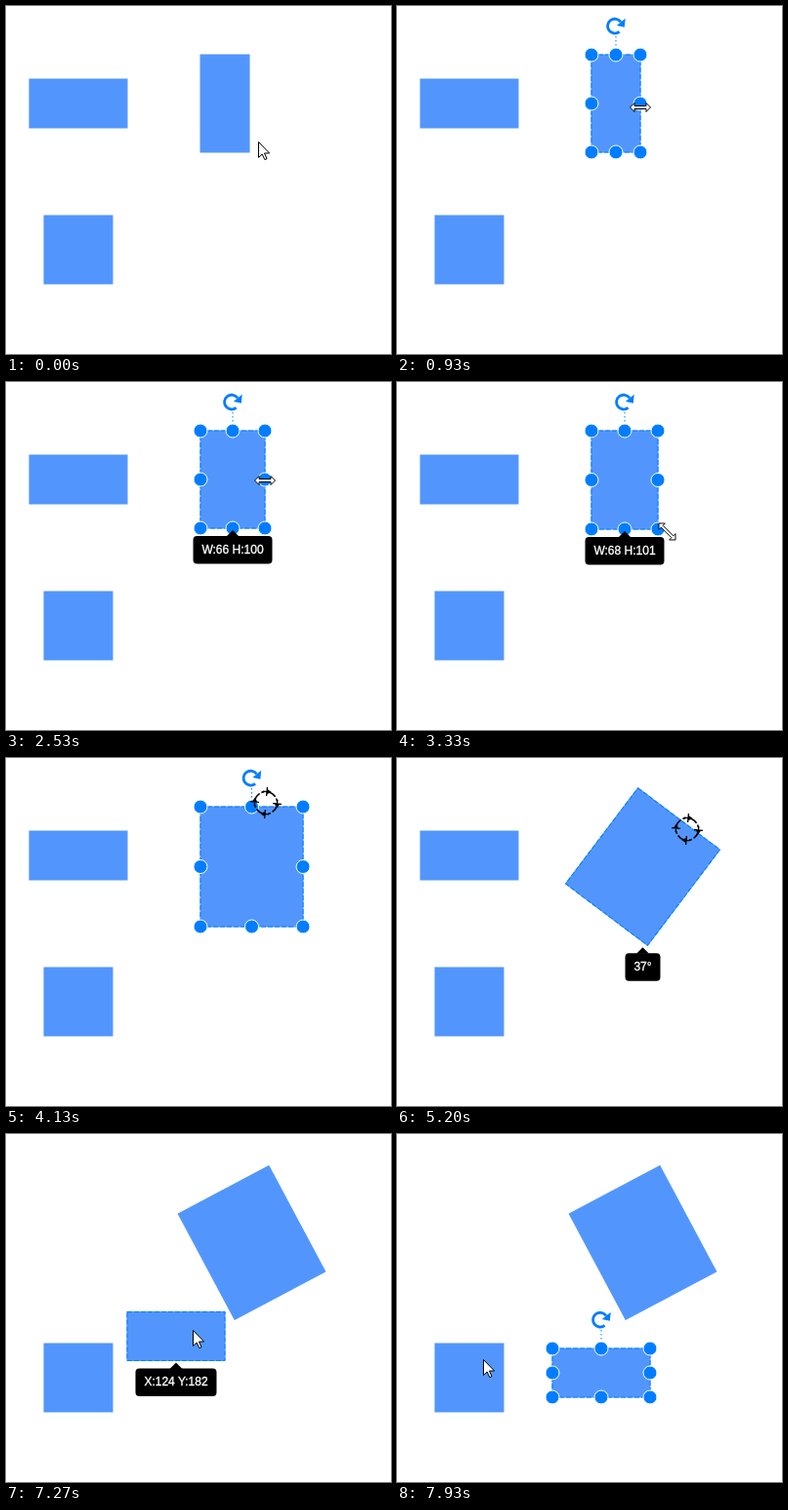
An HTML page for the animation above (8000 ms loop, 394x357 px).

```html
<!DOCTYPE html>
<html lang="en">
<head>
<meta charset="utf-8">
<title>Drag, resize, rotate</title>
<style>
  html, body { margin: 0; width: 100%; height: 100%; overflow: hidden; background: #fff; }
  svg { display: block; }
  .shape { fill: #5296fd; stroke: #5296fd; }
  .frame { fill: none; stroke: #007dff; stroke-dasharray: 5 2; }
  .knob { fill: #007dff; stroke: #fff; }
  .stem { stroke: #007dff; stroke-dasharray: 1.5 2.5; }
  .ring { fill: none; stroke: #007dff; stroke-width: 2.8; }
  .head { fill: #007dff; }
  #label { font: 12px "Liberation Sans", Arial, sans-serif; fill: #fff; stroke: #fff; stroke-width: .35; text-anchor: middle; }
  .pointer { fill: #fff; stroke: #000; }
  .arc { fill: none; stroke: #000; stroke-width: 1.6; stroke-dasharray: 8 2 3 5.06; }
  .barb { stroke: #000; stroke-width: 1.3; }
</style>
</head>
<body>
<svg width="394" height="357" viewBox="0 0 394 357">
  <rect class="shape" x="39" y="215" width="70" height="70"/>
  <rect class="shape" id="wide"/>
  <rect class="shape" id="tall"/>
  <g id="select">
    <rect class="frame" id="frame"/>
    <g id="knobs">
      <g id="rotator">
        <path class="stem" d="M0 -19V-7"/>
        <path class="ring" d="M3.6 -23.6A7.4 7.4 0 1 1 5 -33.6"/>
        <path class="head" d="M9.7 -37.2L8.8 -28.3L.8 -30Z"/>
      </g>
    </g>
  </g>
  <g id="tip">
    <path d="M0 2L6.5 8.5H-6.5Z"/>
    <rect id="body" y="8" height="28.6" rx="4"/>
    <text id="label" y="26"></text>
  </g>
  <g id="cursor">
    <path id="arrow" class="pointer" d="M.5 .5V16.5L4.2 13L6.8 18.6L9 17.7L6.5 12H11.6Z"/>
    <path id="ew" class="pointer" d="M-10.5 0L-6 -4.5V-1.5H6V-4.5L10.5 0L6 4.5V1.5H-6V4.5Z"/>
    <path id="nwse" class="pointer" transform="translate(-.5 -.5) rotate(45)" stroke-width=".9"
      d="M-12 0L-7.5 -4.5V-1.3H7.5V-4.5L12 0L7.5 4.5V1.3H-7.5V4.5Z"/>
    <g id="turn" transform="translate(14 14)"><circle class="arc" r="11.5" transform="rotate(15)"/></g>
  </g>
</svg>
<script>
const FRAMES = 120, FPS = 15;
const $ = id => document.getElementById(id);
const set = (el, attrs) => { for (const k in attrs) el.setAttribute(k, attrs[k]); };
const add = (parent, tag, attrs) => {
  const el = document.createElementNS('http://www.w3.org/2000/svg', tag);
  set(el, attrs);
  return parent.appendChild(el);
};
const show = (el, on) => { el.style.display = on ? '' : 'none'; };
const within = (n, a, b) => n >= a && n < b;
const ramp = (n, a, b) => Math.min(1, Math.max(0, (n - a) / (b - a)));
const ease = p => p * p * (3 - 2 * p);
const radians = deg => deg * Math.PI / 180;

// Each drag: first frame, frame of release
const drags = [[19, 27], [36, 40], [50, 57], [68, 87], [100, 115]];
const ROTATE = 3, MOVE = 4;

const knobs = [];
for (const x of [-1, 0, 1]) for (const y of [-1, 0, 1])
  if (x || y) knobs.push({ x, y, el: add($('knobs'), 'circle', { class: 'knob', r: 7 }) });

for (let a = 5; a < 360; a += 90)
  add($('turn'), 'path', { class: 'barb', d: 'M0 -16V-7M0 -13.5L3.5 -11.5L0 -9.5ZM-4 -11.5H0', transform: `rotate(${a})` });

function wideBox(n) {
  const p = ease(ramp(n, 99, 114));
  return { x: 24 + 135 * p, y: 75 + 145 * p, w: 100, h: 50, a: 0 };
}

function tallBox(n) {
  const grow = ramp(n, 49.6, 56);
  return {
    x: 199, y: 50,
    w: Math.round(50 + 68 * ramp(n, 18, 23) - 52 * ramp(n, 35, 38) + 39 * grow),
    h: Math.round(100 + 23 * grow),
    a: 50 * ramp(n, 67, 75) - 78 * ramp(n, 77, 83)
  };
}

// Legs are [from, to, x, y]; each glides on from the last
const walk = (n, start, legs) => legs.reduce(([x, y], [from, to, tx, ty]) => {
  const p = ramp(n, from, to);
  return [x + (tx - x) * p, y + (ty - y) * p];
}, start);

// The pointer circles the tall box while turning it
function orbit(n) {
  const box = tallBox(n), angle = radians(box.a * 0.85);
  const r = 80 + 8 * ramp(n, 62, 64) - 27 * ramp(n, 67, 75);
  return [box.x + box.w / 2 + r * Math.sin(angle), box.y + box.h / 2 - r * Math.cos(angle)];
}

// Elsewhere it follows the edge or box it holds
function mouse(n) {
  if (n < 62) {
    const { w, h } = tallBox(n);
    const [x, y] = walk(n, [258, 139], [[0, 6, 245, 126], [9, 14, 249, 104], [18, 23, 249, 110],
      [26, 31, 249, 101], [39, 43, 250, 152], [49, 50, 259, 153], [56, 62, 197, 8]]);
    return [x + w - 50, y + h - 100];
  }
  if (n < 87) return orbit(n);
  const box = wideBox(n);
  const [x, y] = walk(n, orbit(86), [[86, 94, 91, 94], [114, 119, -47, 86]]);
  return [x + box.x - 24, y + box.y - 75];
}

function cursorName(n) {
  if (within(n, 12, 41)) return 'ew';
  if (within(n, 42, 58)) return 'nwse';
  if (within(n, 62, 88)) return 'turn';
  return 'arrow';
}

const rectOf = b => ({ x: -b.w / 2, y: -b.h / 2, width: b.w, height: b.h });
const place = b => `translate(${b.x + b.w / 2} ${b.y + b.h / 2}) rotate(${b.a})`;

function drawSelection(n, box, knobsOn) {
  show($('select'), n >= 9);
  show($('knobs'), knobsOn);
  set($('select'), { transform: place(box) });
  set($('frame'), rectOf(box));
  set($('rotator'), { transform: `translate(0 ${-box.h / 2})` });
  for (const k of knobs) set(k.el, { cx: k.x * box.w / 2, cy: k.y * box.h / 2 });
}

function drawTip(box, kind, alpha) {
  show($('tip'), alpha > 0);
  if (alpha <= 0) return;
  const r = Math.round;
  $('label').textContent = kind === MOVE ? `X:${r(box.x)} Y:${r(box.y)}`
    : kind === ROTATE ? `${r(box.a)}°` : `W:${box.w} H:${box.h}`;
  const w = $('label').getComputedTextLength() + 17.8;
  const rad = radians(Math.abs(box.a));
  const half = (box.w * Math.sin(rad) + box.h * Math.cos(rad)) / 2;
  set($('body'), { x: -w / 2, width: w });
  set($('tip'), { opacity: alpha, transform: `translate(${box.x + box.w / 2} ${box.y + box.h / 2 + half})` });
}

function draw(n) {
  const wide = wideBox(n), tall = tallBox(n);
  set($('wide'), { ...rectOf(wide), transform: place(wide) });
  set($('tall'), { ...rectOf(tall), transform: place(tall) });

  const box = n < 97 ? tall : wide;
  const kind = drags.filter(d => n >= d[0]).length - 1;
  const release = kind < 0 ? -Infinity : drags[kind][1];
  drawSelection(n, box, kind < ROTATE || n >= release);
  drawTip(box, kind, 0.83 - 0.33 * (n - release) > 0.83 ? 1 : 0.83 - 0.33 * (n - release));

  const [mx, my] = mouse(n).map(Math.round), name = cursorName(n);
  set($('cursor'), { transform: `translate(${mx} ${my})` });
  for (const id of ['arrow', 'ew', 'nwse', 'turn']) show($(id), id === name);
}

const start = performance.now();
function tick() {
  const t = performance.now() - start;
  draw(Math.floor(t * FPS / 1000 + 0.1) % FRAMES);
  requestAnimationFrame(tick);
}
tick();
</script>
</body>
</html>
```
